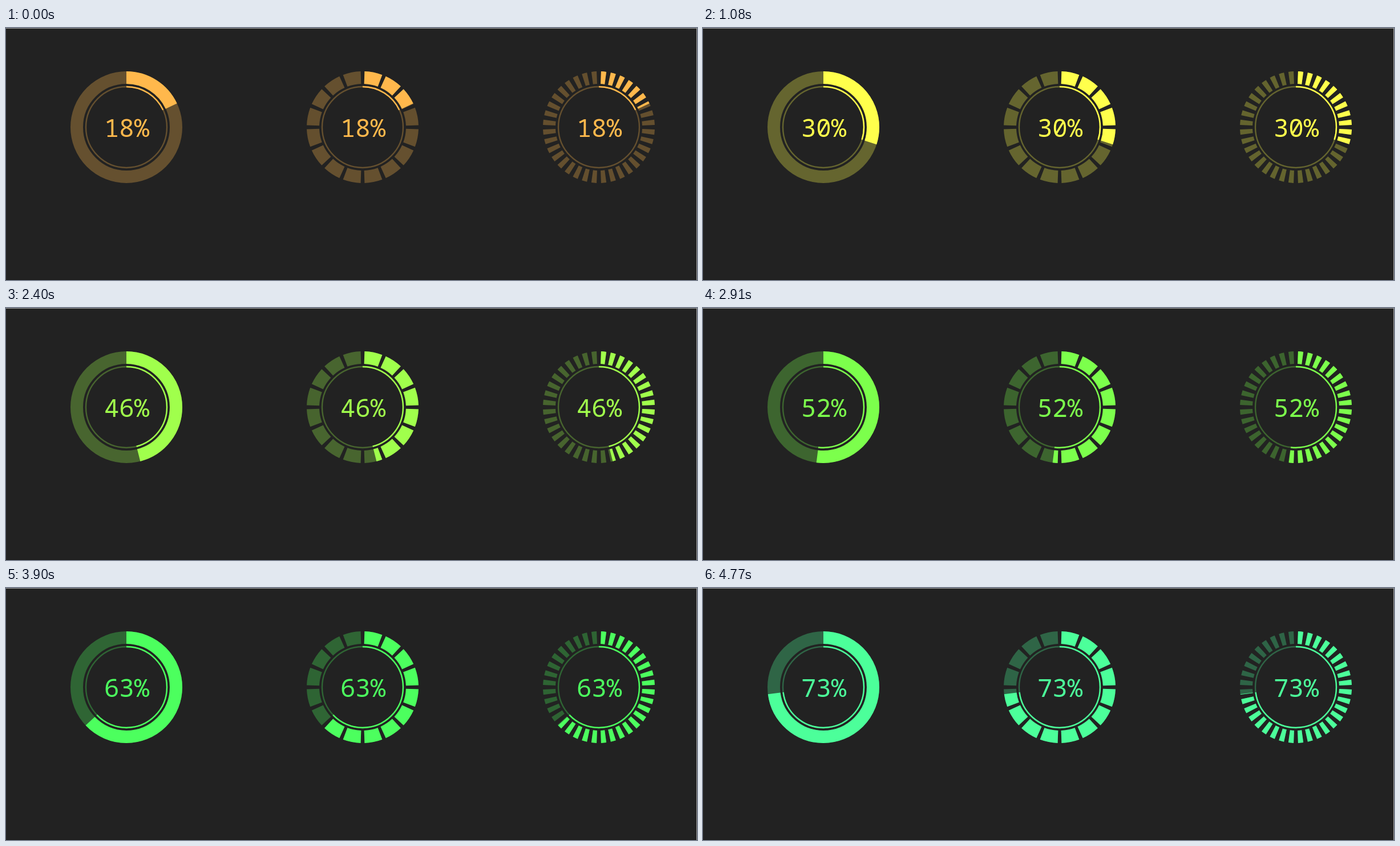
Animation, 1211 px wide and 442 px high, one loop 4.79 s. Source, as an HTML page with a canvas:

```html
<!DOCTYPE html>
<html lang="en">
<head>
<meta charset="utf-8">
<title>Ring progress</title>
<style>
  html, body { margin: 0; width: 100%; height: 100%; overflow: hidden; background: #222; }
  canvas { display: block; }
</style>
</head>
<body>
<canvas id="stage" width="1211" height="442"></canvas>
<script>
const ctx = document.getElementById('stage').getContext('2d');
const W = 1211, H = 442;
const LOOP = 4790, STEP = 120;
const RATE = 0.0117;            // percent per ms
const CY = 174;
const RAD = Math.PI / 180;

// first and last update of each run of regular steps, in ms
const runs = [[0, 2640], [2790, 3150], [3300, 4140], [4290, 4770]];

// pitch and gap of the outer ring's segments, in degrees
const rings = [
  { x: 211, pitch: 360, gap: 0 },
  { x: 625, pitch: 22.5, gap: 4 },
  { x: 1039, pitch: 10, gap: 4.6 }
];

function snap(t) {
  const [first, last] = runs.filter(r => r[0] <= t).pop();
  return Math.min(last, first + Math.floor((t - first) / STEP) * STEP);
}

function arc(x, radius, width, from, to) {
  ctx.lineWidth = width;
  ctx.beginPath();
  ctx.arc(x, CY, radius, (from - 90) * RAD, (to - 90) * RAD);
  ctx.stroke();
}

function gauge({ x, pitch, gap }, sweep) {
  for (let a = 0; a < sweep; a += pitch) {
    const from = a + gap / 2;
    const to = Math.min(sweep, a + pitch - gap / 2);
    if (to > from) arc(x, 87, 22, from, to);
  }
  arc(x, 71, 2.4, 0, sweep);
}

function draw(t) {
  const pct = 18 + Math.floor(snap(t) * RATE);
  const hue = pct * 2;

  ctx.fillStyle = '#222';
  ctx.fillRect(0, 0, W, H);
  ctx.fillStyle = '#1b1b1b';
  ctx.fillRect(0, H - 1, W, 1);
  ctx.fillStyle = '#a0a0a0';
  ctx.fillRect(0, 0, W, 1);
  ctx.fillRect(W - 1, 0, 1, H);

  ctx.font = '44px "Noto Sans Mono", "DejaVu Sans Mono", monospace';
  ctx.textAlign = 'center';
  for (const ring of rings) {
    ctx.strokeStyle = `hsla(${hue}, 100%, 65%, 0.3)`;
    gauge(ring, 360);
    ctx.strokeStyle = ctx.fillStyle = `hsl(${hue}, 100%, 65%)`;
    gauge(ring, pct * 3.6);
    ctx.fillText(pct + '%', ring.x + 0.5, 190.5);
  }
}

const start = performance.now();
function tick() {
  draw((performance.now() - start) % LOOP);
  requestAnimationFrame(tick);
}
tick();
</script>
</body>
</html>
```
